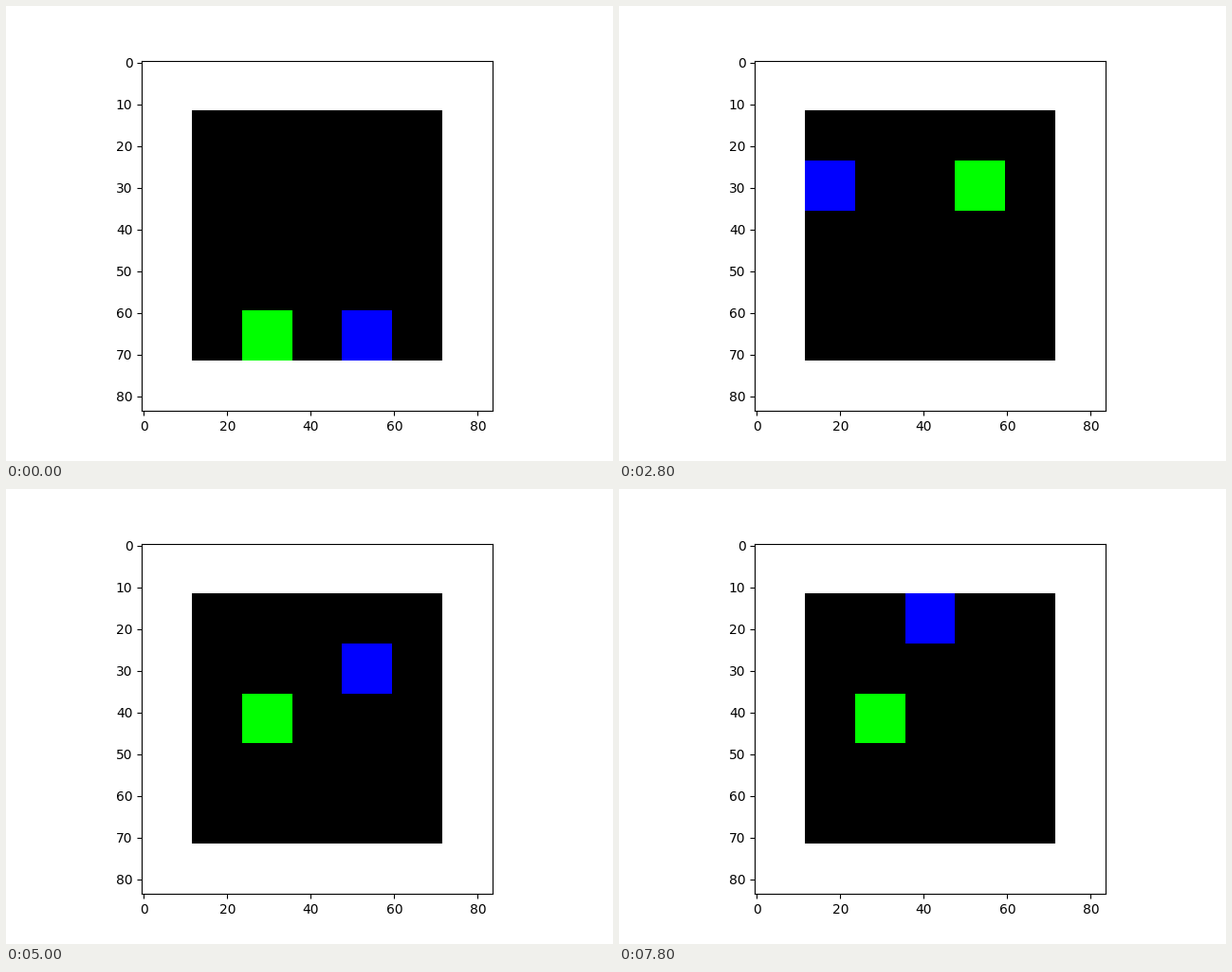
A matplotlib script that plays this animation: 640x480 px, repeating every 8 s.

```python
import numpy as np
import matplotlib.pyplot as plt
from matplotlib.animation import FuncAnimation

CELL = 12    # image pixels per grid cell
GRID = 7     # cells per side, including the white border
STEP_MS = 200
GREEN = (0, 255, 0)
BLUE = (0, 0, 255)
MOVES = {"U": (0, -1), "D": (0, 1), "L": (-1, 0), "R": (1, 0), ".": (0, 0)}


def walk(start, moves):
    """Return the (column, row) cell at every step of a walk."""
    steps = [start] + [MOVES[m] for m in moves]
    return np.cumsum(steps, axis=0)


green_path = walk((2, 5), "RRRULR.UUULRDLDLRRLLDRLLURDUURDDUULDUDL")
blue_path = walk((4, 5), "ULLLDUUURRRLLLURRRRDDDULUULLDDDRUDLUUUR")


def render(i):
    world = np.full((GRID, GRID, 3), 255, dtype=np.uint8)
    world[1:-1, 1:-1] = 0
    for path, color in ((green_path, GREEN), (blue_path, BLUE)):
        col, row = path[i]
        world[row, col] = color
    return world.repeat(CELL, axis=0).repeat(CELL, axis=1)


fig, ax = plt.subplots(figsize=(6.4, 4.8), dpi=100)
image = ax.imshow(render(0), interpolation="nearest")


def update(i):
    image.set_data(render(i))
    return (image,)


anim = FuncAnimation(fig, update, frames=len(green_path), interval=STEP_MS,
                     repeat=True, repeat_delay=0)
plt.show()
```
